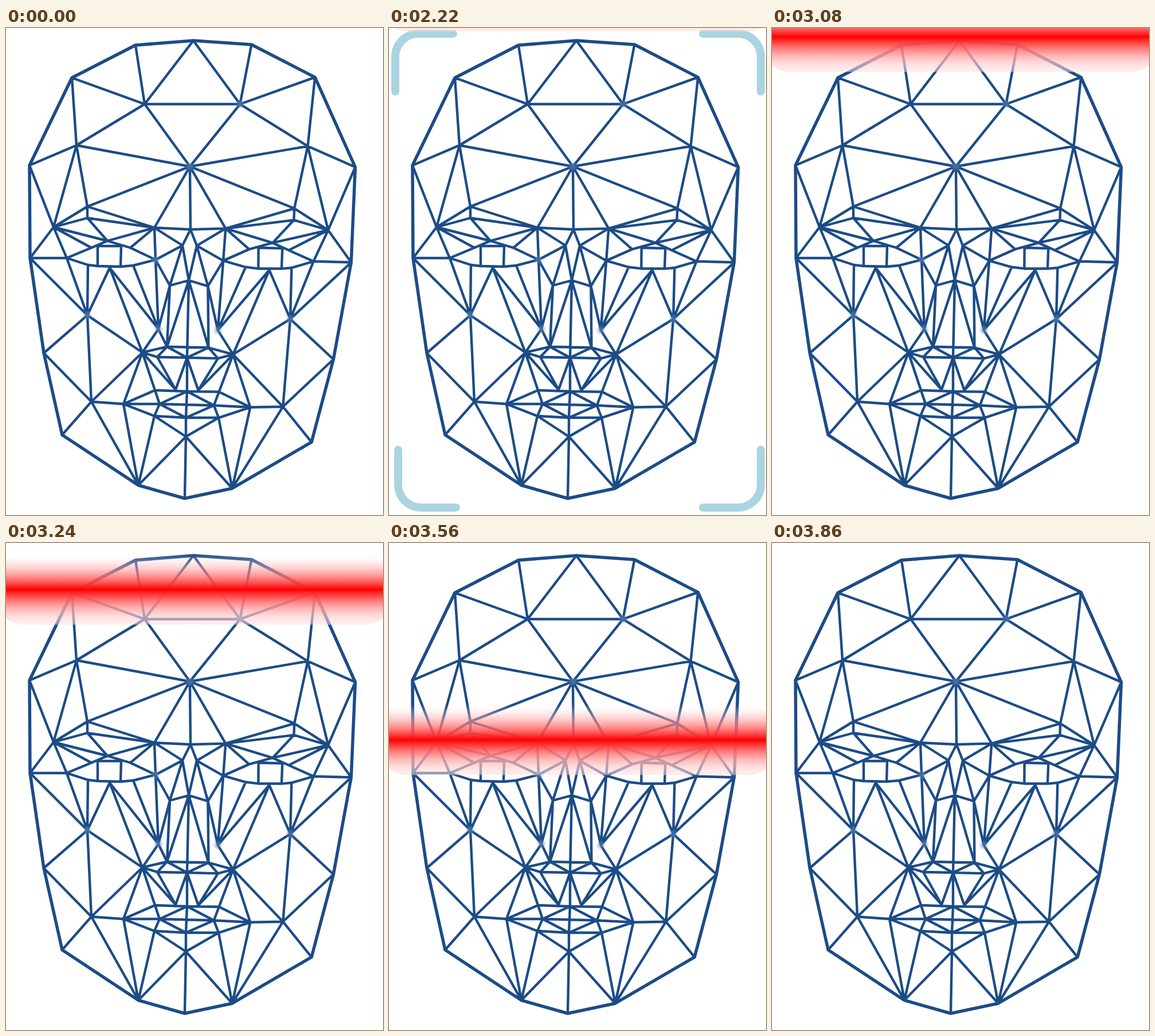
An HTML page that plays this animation: 658 by 851 pixels, repeating every 4.04 s.

```html
<!DOCTYPE html>
<html lang="en">
<head>
<meta charset="utf-8">
<title>Face scan</title>
<style>
  html, body { margin: 0; width: 100%; height: 100%; overflow: hidden; background: #fff; }
  #stage { position: relative; width: 658px; height: 851px; overflow: hidden; }
  svg { position: absolute; inset: 0; }
  .mesh { fill: none; stroke: #1c4c86; stroke-linecap: round; stroke-linejoin: round; }
  #corners { fill: none; stroke: rgb(142, 198, 215); stroke-width: 14; stroke-linecap: round; }
  #beam { position: absolute; left: -15px; top: -123px; width: 688px; height: 123px; border-radius: 45px; }
</style>
</head>
<body>
<div id="stage">
  <svg width="658" height="851" viewBox="0 0 658 851">
    <defs>
      <radialGradient id="glow">
        <stop offset="0" stop-color="#6f92bd" stop-opacity=".5"/>
        <stop offset=".5" stop-color="#6f92bd" stop-opacity=".4"/>
        <stop offset="1" stop-color="#6f92bd" stop-opacity="0"/>
      </radialGradient>
    </defs>
    <path id="outline" class="mesh" stroke-width="5.5"/>
    <path id="edges" class="mesh" stroke-width="4.4"/>
    <g id="dots" fill="url(#glow)"></g>
    <path id="corners" d="M11 111V50A40 40 0 0 1 51 10H112 M548 10H609A40 40 0 0 1 649 50V111
      M16 737V798A40 40 0 0 0 56 838H117 M548 838H609A40 40 0 0 0 649 798V737"/>
  </svg>
  <div id="beam"></div>
</div>
<script>
const $ = id => document.getElementById(id);

// Key points of the left half and the midline (z); the right half is mirrored.
const regions = {
  z: '327,22 321,242 322,352 319,441 316,576 316,635 314,681 314,714 312,822',
  o: '226,30 115,87 41,240 42,402 66,568 98,711 231,799',
  f: '242,133 123,205',
  b: '142,312 142,332 83,348 259,349',
  e: '177,372 106,402 149,384 217,384 261,405 222,415 143,414',
  p: '160,381 201,381 200,417 160,416',
  n: '308,380 286,450 281,557 264,575 296,632',
  c: '266,526 142,502 238,567 149,653 181,419',
  m: '205,657 260,633 268,657 259,678'
};
const left = {};
for (const [key, list] of Object.entries(regions))
  list.split(' ').forEach((p, i) => left[key + i] = p.split(',').map(Number));

// Reflect across a leaning axis; the right side is slightly wider and sags lower down.
function mirror([x, y]) {
  const axis = 327.5 - .0185 * y, half = axis - x;
  return [axis + half + half * half / 18000, y + half * (y - 130) / 10000];
}
const right = {};
for (const k in left) right[k] = k[0] === 'z' ? left[k] : mirror(left[k]);

const chains = [
  // forehead
  'o0 f0 z0', 'o1 f0 f1 o1', 'o2 f1 z1 f0', 'o2 b2 f1 b0 z1 b3',
  // brow and eye
  'b0 b1 b2 b0 b3 b1 e0 b2 e2', 'z2 b3 e0', 'e3 b3 e4', 'o3 b2 e1 o3',
  'e1 e2 e0 e3 e4 e5 p2 p3 e6 e1', 'p0 p1 p2 p3 p0',
  // nose
  'b3 n0 z2', 'e4 n0 z3 n1 n0', 'n1 e4 c0 n1 n2 z3', 'z4 n2 n3 z4 n4 n3 c2 n4', 'n2 c2',
  // cheek
  'e5 c0 c4 c1 e6', 'e1 c1 o3', 'c0 c2 c4', 'o4 c1 c3 o4', 'c1 c2 c3 m0 c2 m1', 'o5 c3 o6',
  // mouth and chin
  'm0 m1 z5 m2 m0 m3 z6 m2 m1', 'm2 m3 z7 o6 m3', 'm0 o6'
];
const middle = ['f0 z1', 'z1 z2', 'z3 z4 z5 z6 z7 z8', 'c0 n2'];
const bridges = ['f0', 'n2', 'm2'];   // points joined straight to their mirror image

const join = points => 'M' + points.map(p => p.join()).join('L');
const trace = side => chain => join(chain.split(' ').map(k => side[k]));
$('edges').setAttribute('d', [
  ...chains.map(trace(left)), ...chains.map(trace(right)), ...middle.map(trace(left)),
  ...bridges.map(k => join([left[k], right[k]]))
].join(''));

const rim = side => Object.keys(side).filter(k => k[0] === 'o').map(k => side[k]);
$('outline').setAttribute('d',
  join([left.z0, ...rim(right), left.z8, ...rim(left).reverse()]) + 'Z');

const glows = [left.z1, right.f0, left.e4, left.c0, right.c0, left.c1, right.c1];
for (const [x, y] of glows) {
  const dot = document.createElementNS('http://www.w3.org/2000/svg', 'circle');
  dot.setAttribute('cx', x);
  dot.setAttribute('cy', y);
  dot.setAttribute('r', 9);
  $('dots').append(dot);
}

// Beam: red core that pales outwards; the upper rim is clear, the lower one a milky pink.
const STOPS = 32;
const stops = Array.from({ length: STOPS + 1 }, (_, i) => {
  const d = 2 * i / STOPS - 1, far = Math.abs(d), lower = d > 0;
  const tint = lower ? .07 + .93 * (1 - far) ** 1.8 : (1 - far) ** 1.8;
  const alpha = 1 - (lower ? .5 : 1) * far ** 1.5;
  const pale = Math.round(255 * (1 - tint / (alpha || 1)));
  return `rgba(255, ${pale}, ${pale}, ${alpha.toFixed(3)})`;
});
$('beam').style.background = `linear-gradient(${stops})`;

const LOOP = 4040, START = 1540, PEAK = 2050, FADED = 2580, SWEEP = 2640, END = 3860;
const clamp = x => Math.min(1, Math.max(0, x));
const smooth = x => x * x * (3 - 2 * x);

function cornerAlpha(t) {
  if (t < START || t >= FADED) return 0;
  return t < PEAK
    ? .08 + .92 * smooth((t - START) / (PEAK - START))
    : smooth((FADED - t) / (FADED - PEAK));
}

// Lower edge of the beam: a slow creep, then an accelerating sweep.
function beamEdge(t) {
  if (t < SWEEP) return 3 + 3 * clamp((t - START) / 600);
  const s = (t - SWEEP) / 1000;
  return 6 + 358 * s ** 2 + 157 * s ** 6;
}

function draw(now) {
  const t = now % LOOP;
  $('corners').style.opacity = cornerAlpha(t);
  $('beam').style.visibility = t >= START && t < END ? 'visible' : 'hidden';
  $('beam').style.transform = `translateY(${beamEdge(t).toFixed(2)}px)`;
}
function tick() {
  draw(performance.now());
  requestAnimationFrame(tick);
}
tick();
</script>
</body>
</html>
```
